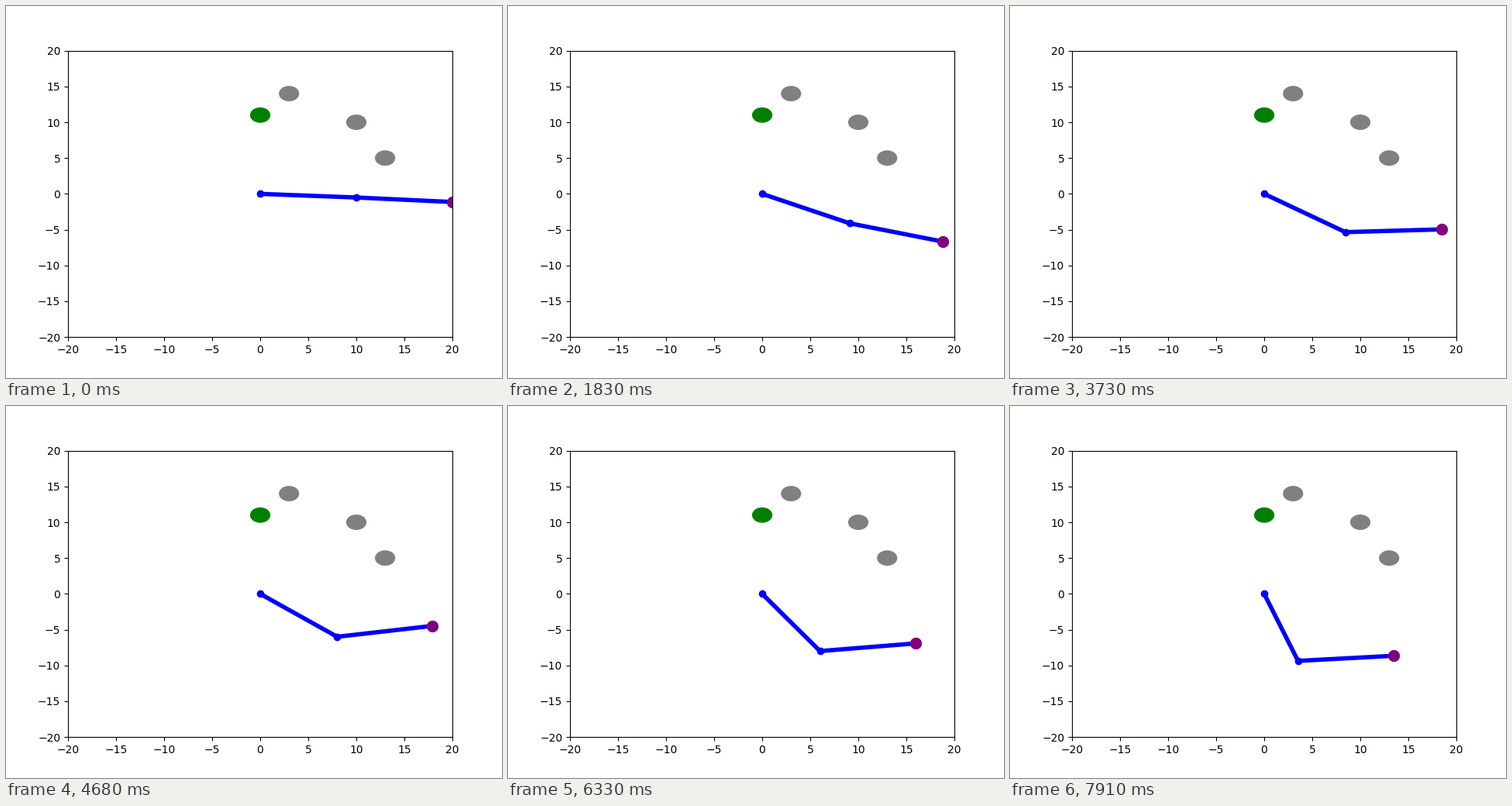
Write a matplotlib script that moves like this. It is 640x480 px and loops after 8000 ms.

```python
import matplotlib.pyplot as plt
import numpy as np
from matplotlib.animation import FuncAnimation
from matplotlib.patches import Circle

LOOP = 8000
TICK = 20
LINK = 10

# Waypoints of each link's heading: step -> degrees, joined by straight moves
UPPER = {0: -2.9, 8: -10.5, 20: -24.3, 40: -32.3, 54: -38.6, 60: -46.3, 84: -69.4}
LOWER = {0: -3.6, 8: -6.2, 24: -17.6, 40: 2.2, 54: 11.3, 74: 3.4, 78: -0.9, 84: 4.1}

fig, ax = plt.subplots(figsize=(6.4, 4.8), dpi=100)
ax.set_xlim(-20, 20)
ax.set_ylim(-20, 20)

for center in [(3, 14), (10, 10), (13, 5)]:
    ax.add_patch(Circle(center, 1, color="gray"))
ax.add_patch(Circle((0, 11), 1, color="green"))

arm, = ax.plot([], [], "o-", color="blue", lw=4, markersize=6)
hand, = ax.plot([], [], "o", color="purple", markersize=10)


def step_at(ms):
    """Two short steps first, then holds of 130 and 60 ms in turn."""
    if ms < 120:
        return ms // 60
    pair, rest = divmod(ms - 120, 190)
    return 2 + 2 * pair + (rest >= 130)


def heading(path, step):
    return np.radians(np.interp(step, list(path), list(path.values())))


def joints(step):
    angles = np.array([heading(UPPER, step), heading(LOWER, step)])
    x = np.append(0, np.cumsum(LINK * np.cos(angles)))
    y = np.append(0, np.cumsum(LINK * np.sin(angles)))
    return x, y


def update(i):
    x, y = joints(step_at(i * TICK + TICK // 2))
    arm.set_data(x, y)
    hand.set_data(x[-1:], y[-1:])
    return arm, hand


anim = FuncAnimation(fig, update, frames=LOOP // TICK, interval=TICK,
                     repeat=True, repeat_delay=0)
plt.show()
```
